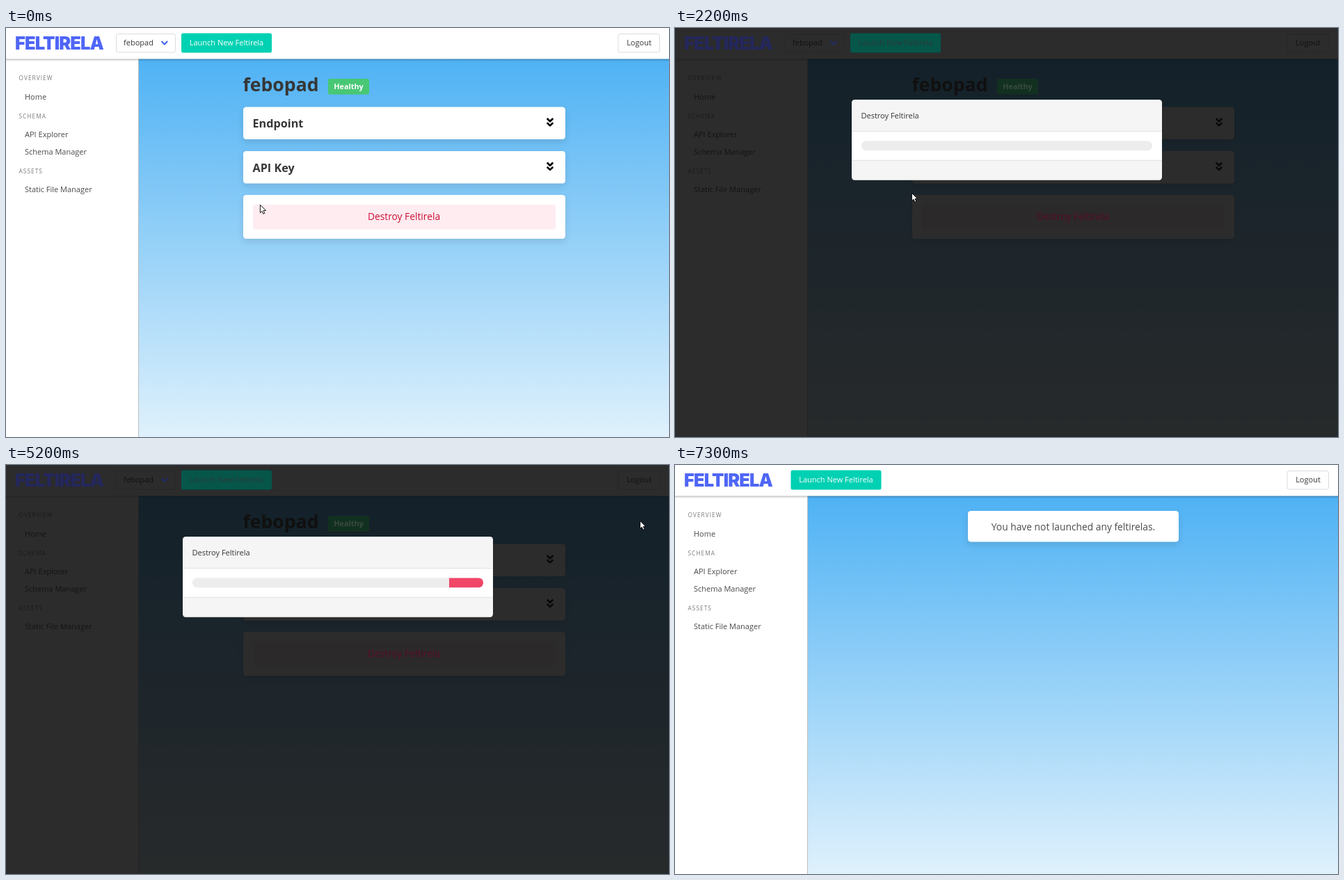
Animation of 953 by 588 pixels, one loop 8.4 s. Source, as an HTML page:

```html
<!DOCTYPE html>
<html lang="en">
<head>
<meta charset="utf-8">
<title>Destroy dialog</title>
<style>
  html, body { margin: 0; width: 100%; height: 100%; overflow: hidden; background: #fff; }
  svg { display: block; width: 953px; height: 588px; }
  text { font: 11px "Open Sans", "Noto Sans", sans-serif; fill: #363636; }
  .mid { text-anchor: middle; }
  .big { font-size: 13.8px; fill: #4a4a4a; }
  .bold { font-weight: 700; }
  .label { font-size: 8.3px; letter-spacing: 1.05px; fill: #7a7a7a; }
  .brand { font: 900 25.5px Inter, sans-serif; letter-spacing: -.9px; }
  .card { fill: #fff; filter: drop-shadow(0 4px 5px rgba(10, 10, 10, .11)); }
  .bar { fill: #fff; filter: drop-shadow(0 1px 1.5px rgba(0, 0, 0, .35)); }
  .line { fill: none; stroke-linecap: round; stroke-linejoin: round; }
</style>
</head>
<body>
<svg id="stage" viewBox="0 0 953 588" xmlns="http://www.w3.org/2000/svg"></svg>
<script>
const NAME = "Feltirela", APP = "febopad";
const LOOP = 8400, STEP = 100;

const rect = (x, y, w, h, fill, r = 0, more = "") =>
  `<rect x="${x}" y="${y}" width="${w}" height="${h}" rx="${r}" fill="${fill}" ${more}/>`;
const text = (x, y, str, cls = "", style = "") =>
  `<text x="${x}" y="${y}" class="${cls}" style="${style}">${str}</text>`;
const group = (id, body) => `<g id="${id}">${body}</g>`;
const line = (d, color, w) => `<path class="line" d="${d}" stroke="${color}" stroke-width="${w}"/>`;

const outlined = (x, w, y = 8, id = "") =>
  rect(x + .5, y + .5, w - 1, 26.5, "#fff", 2.8, `stroke="#dbdbdb" id="${id}"`);
const card = (x, y, w, h) => rect(x, y, w, h, "#fff", 4.2, 'class="card"');
const brand = color => text(13, 31, NAME.toUpperCase(), "brand", `fill:${color}`);
const launch = (x, fill, ink) =>
  rect(x, 7.5, 130, 28, fill, 2.8) +
  text(x + 65, 25, `Launch New ${NAME}`, "mid", `fill:${ink}`);
const picker = color => line("M224 19.6l3.8 3.9 3.8-3.9", color, 2.1);
const tag = (fill, ink) =>
  rect(463, 73, 59, 22.5, fill, 2.8) +
  text(492.5, 88, "Healthy", "mid bold", `font-size:10.8px;fill:${ink}`);
const destroy = ink => text(572, 276, `Destroy ${NAME}`, "mid big", `fill:${ink}`);
const chevrons = y => [0, 6.2].map(d =>
  `<path d="M777.7 ${y + d}l4.3 4.2 4.3-4.2" fill="none" stroke="#0a0a0a" stroke-width="2.7" stroke-linejoin="round"/>`).join("");
const fold = (y, title) =>
  card(341, y, 463, 46.5) + text(354.5, y + 29.5, title, "bold", "font-size:16.2px") + chevrons(y + 16.5);

const sidebar =
  rect(0, 44, 190, 544, "#fff") + rect(190, 44, 1, 544, "#bdbdbd") +
  [[75, "OVERVIEW"], [129.5, "SCHEMA"], [208.5, "ASSETS"]].map(([y, s]) => text(18.5, y, s, "label")).join("") +
  [[102.5, "Home"], [157, "API Explorer"], [182, "Schema Manager"], [236, "Static File Manager"]]
    .map(([y, s]) => text(27, y, s, "", "fill:#4a4a4a")).join("");

// Modal frame; the body grows or shrinks with its content.
const modal = (foot, bottom, body) =>
  rect(254, 103, 446, bottom - 103, "#f5f5f5", 4.2) +
  rect(254, 148, 446, foot - 148, "#fff") +
  rect(254, 148, 446, .8, "#dbdbdb") + rect(254, foot - .2, 446, .8, "#dbdbdb") +
  text(267.5, 129.5, `Destroy ${NAME}`) + body;

const askBody =
  text(477, 176, `Are you sure you want to destroy this ${NAME}? This action is`, "mid big") +
  text(477, 193, "irreversible.", "mid big") +
  rect(268, 226, 108, 28, "#f14668", 2.8, 'id="confirm"') +
  text(322, 244, `Destroy ${NAME}`, "mid", "fill:#fff") +
  outlined(381.5, 57.5, 226) + text(410, 244, "Cancel", "mid");

const progress =
  rect(268, 162.3, 418, 14, "#ededed", 7) +
  `<g clip-path="url(#track)">${rect(0, 162.3, 188, 14, "#f14668", 0, 'id="fill"')}</g>`;

const stage = document.getElementById("stage");
stage.innerHTML =
  `<defs>
    <linearGradient id="sky" x1="0" y1="0" x2="0" y2="1">
      <stop offset="0" stop-color="#4fb2f4"/><stop offset="1" stop-color="#dff1fc"/>
    </linearGradient>
    <clipPath id="track">${rect(268, 162.3, 418, 14, "#000", 7)}</clipPath>
  </defs>` +
  rect(190, 44, 763, 544, "url(#sky)") + sidebar +
  rect(-5, -5, 963, 49.5, "#fff", 0, 'class="bar"') + brand("#4f66f6") +
  outlined(879.5, 60.5, 8, "logout") + text(910, 25, "Logout", "mid") +
  group("full",
    outlined(158, 86) + text(169, 25, APP) + picker("#3f68e8") + launch(252, "#00d1b2", "#fff") +
    text(340.5, 91, APP, "bold", "font-size:26.6px") + tag("#48c774", "#fff") +
    fold(113.5, "Endpoint") + fold(177, "API Key") +
    card(341, 240, 463, 63) + rect(355, 254, 435, 35.5, "#feecf0", 2.8) + destroy("#cc0f35")) +
  group("empty",
    launch(166.5, "#00d1b2", "#fff") + card(421, 66, 303, 44.5) +
    text(572.5, 93.5, `You have not launched any ${NAME.toLowerCase()}s.`, "mid big")) +
  group("dim",
    rect(0, 0, 953, 588, "rgba(10,10,10,.86)") + brand("#25285c") +
    group("dimFull",
      picker("#262f6b") + launch(252, "#06564a", "#2c3a38") + tag("#123020", "#3a4a3f") + destroy("#58162a") +
      rect(352.5, 252, 439, 39.5, "none", 4, 'id="ring" stroke="#332428"')) +
    group("dimEmpty", launch(166.5, "#06564a", "#2c3a38"))) +
  group("ask", modal(211, 267.5, askBody)) +
  group("busy", modal(190, 218.7, progress)) +
  group("done", modal(194, 222.2, text(477, 176, `${NAME} successfully destroyed.`, "mid big"))) +
  group("close",
    '<circle id="halo" cx="928.6" cy="23.6" r="10" fill="#181818"/>' +
    '<path d="M925 20l7.2 7.2M932.2 20l-7.2 7.2" stroke="#fff" stroke-width="1.7"/>') +
  group("cursor",
    '<path id="arrow" d="M.4 .3v11.4l2.6-2.5 1.8 4.1 2-.9-1.8-4h3.6z" fill="#fff" stroke="#000" stroke-width=".9"/>' +
    '<path id="hand" d="M-1.4 .6q1.2-1.3 2.3 0v4l5 .9q1.1.4 1 1.8l-.6 3v2h-6.2l-3.2-4.5q-.6-1.5.5-1.7l1.2.9z" fill="#fff" stroke="#000" stroke-width=".9"/>');

const el = {};
stage.querySelectorAll("[id]").forEach(n => el[n.id] = n);
const show = (id, on) => { el[id].style.display = on ? "" : "none"; };

// Pointer waypoints: time, x, y.
const path = [
  [0, 365, 254], [300, 454, 275], [1300, 454, 275], [1700, 340, 237], [2500, 340, 237],
  [3000, 660, 358], [3400, 916, 326], [3700, 916, 326], [4300, 911, 80], [5700, 911, 80],
  [6200, 930, 20], [6600, 930, 20], [6900, 520, 45], [7300, -12, 30], [LOOP, -12, 30]
];
function pointer(t) {
  const i = path.findIndex(p => p[0] > t);
  const [t0, x0, y0] = path[i - 1], [t1, x1, y1] = path[i];
  const k = (t - t0) / (t1 - t0);
  return [x0 + (x1 - x0) * k, y0 + (y1 - y0) * k];
}

function render(ms) {
  const t = Math.floor(ms / STEP) * STEP;
  const within = (a, b) => t >= a && t < b;
  const destroyed = t >= 5300;

  show("full", !destroyed);
  show("empty", destroyed);
  show("dim", within(1100, 6500));
  show("dimFull", !destroyed);
  show("dimEmpty", destroyed);
  show("ring", within(1100, 2200));
  show("ask", within(1100, 2200));
  show("busy", within(2200, 5300));
  show("done", within(5300, 6500));
  show("close", within(1100, 2200) || within(5300, 6500));
  show("halo", within(6100, 6500));
  el.confirm.setAttribute("fill", within(1600, 2200) ? "#f03a5f" : "#f14668");
  el.logout.setAttribute("stroke", within(6500, 6700) ? "#b5b5b5" : "#dbdbdb");

  // The stripe crosses twice the track width every 1.5 s.
  const phase = ((t - 2288 + 1500) % 1500) / 1500;
  el.fill.setAttribute("x", t < 2600 ? -200 : 268 - 418 + 836 * phase);

  const [x, y] = pointer(t);
  const hand = within(100, 1100) || within(1600, 2200) || within(6100, 6700);
  show("hand", hand);
  show("arrow", !hand);
  show("cursor", t < 7300);
  el.cursor.setAttribute("transform", `translate(${x} ${y})`);
}

const start = performance.now();
function tick() {
  render((performance.now() - start) % LOOP);
  requestAnimationFrame(tick);
}
tick();
</script>
</body>
</html>
```
